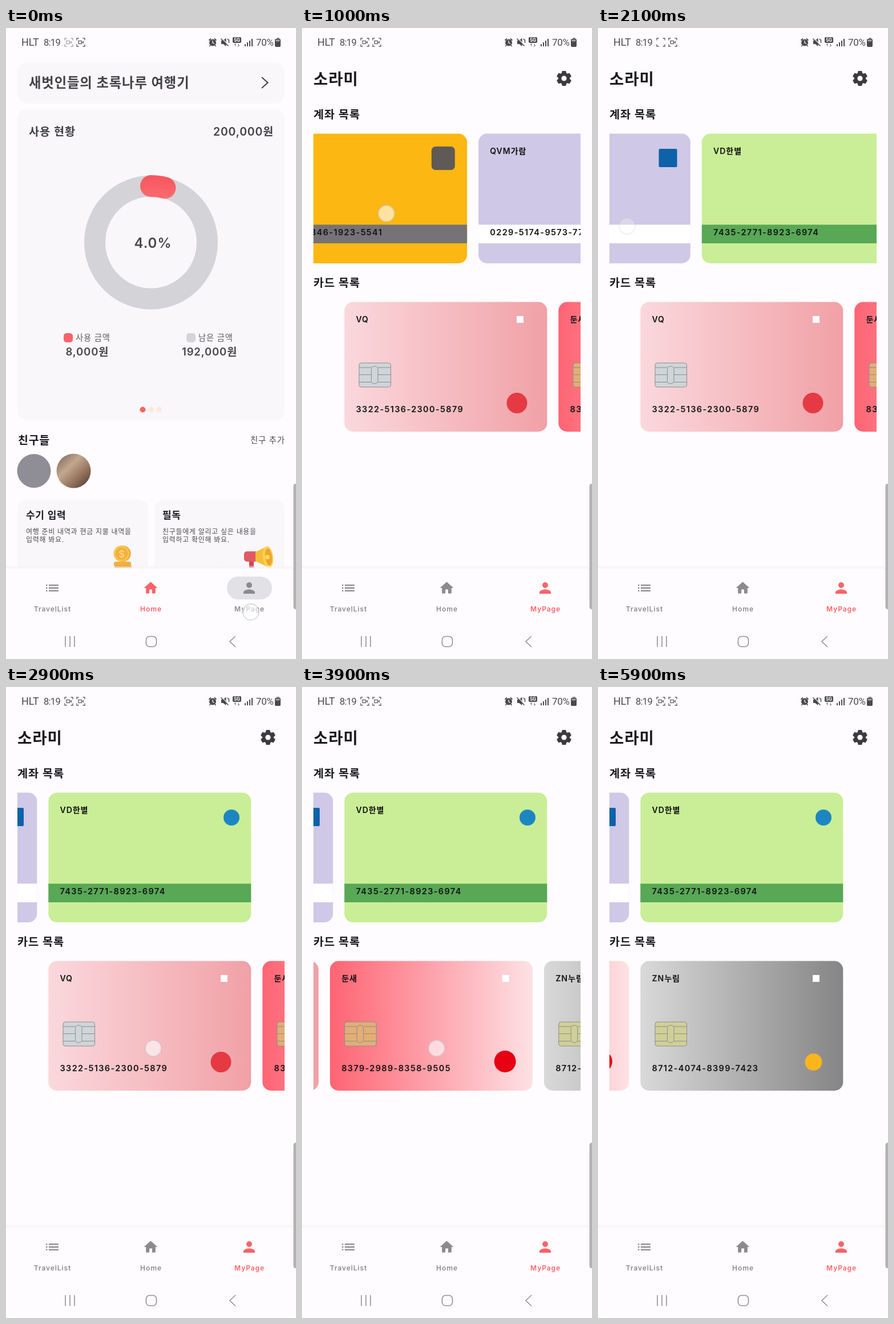
Write an HTML page with a canvas that moves like this. It is 508x1102 px and loops after 6 s.

```html
<!DOCTYPE html>
<html lang="ko">
<head>
<meta charset="utf-8">
<title>My page</title>
<style>
html, body { margin: 0; width: 100%; height: 100%; overflow: hidden; background: #fefcff; }
canvas { display: block; width: 100vw; height: 100vh; }
</style>
</head>
<body>
<canvas id="stage"></canvas>
<script>
const W = 508, H = 1102, LOOP = 6000, STEP = 100;
const PITCH = 375;
const FONT = 'Inter, "Noto Sans CJK KR", "Noto Sans CJK", sans-serif';
const BG = '#fefcff', PANEL = '#f9f7fa', RED = '#fb6268', INK = '#1c1b1f', GREY = '#8d8a8e';

const canvas = document.getElementById('stage');
const ctx = canvas.getContext('2d');
const dpr = window.devicePixelRatio || 1;
canvas.width = W * dpr;
canvas.height = H * dpr;

const clamp = v => Math.max(0, Math.min(1, v));
const smooth = v => { v = clamp(v); return v * v * (3 - 2 * v); };

function box(x, y, w, h, r, fill) {
  ctx.beginPath();
  ctx.roundRect(x, y, w, h, r);
  ctx.fillStyle = fill;
  ctx.fill();
}

function disc(x, y, r, fill) {
  ctx.beginPath();
  ctx.arc(x, y, r, 0, 7);
  ctx.fillStyle = fill;
  ctx.fill();
}

function line(points, color, width) {
  ctx.beginPath();
  points.forEach(([x, y]) => ctx.lineTo(x, y));
  ctx.strokeStyle = color;
  ctx.lineWidth = width;
  ctx.stroke();
}

function poly(points, fill) {
  ctx.beginPath();
  points.forEach(([x, y]) => ctx.lineTo(x, y));
  ctx.fillStyle = fill;
  ctx.fill();
}

function text(s, x, y, size, weight, color, gap = 0.7, align = 'left', font = FONT) {
  ctx.font = `${weight} ${size}px ${font}`;
  ctx.letterSpacing = gap + 'px';
  ctx.textAlign = align;
  ctx.fillStyle = color;
  ctx.fillText(s, x, y);
}

function sweep(x0, y0, x1, y1, ...colors) {
  const g = ctx.createLinearGradient(x0, y0, x1, y1);
  colors.forEach((c, i) => g.addColorStop(i / (colors.length - 1), c));
  return g;
}

function faded(alpha, draw) {
  if (alpha <= 0) return;
  ctx.save();
  ctx.globalAlpha *= alpha;
  draw();
  ctx.restore();
}

// ---------- status bar ----------
function recorder(x, color, on) {
  for (const sx of [-1, 1]) for (const sy of [-1, 1]) {
    line([[x + sx * 3.5, 25 + sy * 7], [x + sx * 7, 25 + sy * 7], [x + sx * 7, 25 + sy * 3.5]], color, 1.4);
  }
  if (!on) return;
  ctx.strokeStyle = color;
  ctx.lineWidth = 1.3;
  ctx.strokeRect(x - 4, 22.5, 5.5, 5);
  poly([[x + 2, 25], [x + 5, 22.5], [x + 5, 27.5]], color);
}

function statusBar(t) {
  const c = '#4a494c', f = 'Roboto, sans-serif';
  text('HLT', 27, 31, 18, 400, c, 0, 'left', f);
  text('8:19', 66, 31, 16.5, 400, c, -0.7, 'left', f);
  const blink = (t >= 1800 && t < 2200) || (t >= 4400 && t < 4900);
  recorder(110, t < 100 ? '#a5a4a7' : '#626164', !blink);
  recorder(131, '#626164', true);

  disc(362, 25.5, 6, c);
  line([[355.5, 21.5], [359, 18.5]], c, 1.8);
  line([[365, 18.5], [368.5, 21.5]], c, 1.8);
  line([[358, 30], [356.5, 32]], c, 1.6);
  line([[366, 30], [367.5, 32]], c, 1.6);
  line([[362, 22], [362, 26], [365, 27.5]], BG, 1.2);

  poly([[377, 22], [380.5, 22], [385.5, 17.5], [385.5, 32], [380.5, 28], [377, 28]], c);
  line([[377.5, 17.5], [390.5, 30.5]], BG, 1.2);
  line([[376.5, 18.5], [389.5, 31.5]], c, 1.5);
  line([[387.5, 19], [390.5, 21], [390.5, 26]], c, 1.5);

  box(397, 16, 15, 10, 2, c);
  text('5G', 404.5, 24, 8.5, 700, BG, 0, 'center', f);
  line([[402, 32], [402, 27.5], [400, 29.5]], '#8b8a8d', 1.2);
  line([[407, 27.5], [407, 32], [409, 30]], '#8b8a8d', 1.2);
  for (let i = 0; i < 4; i++) box(418 + i * 4, 28 - i * 3, 2, 4 + i * 3, 0, c);
  text('70%', 438, 31, 17, 400, c, -0.3, 'left', f);
  box(474, 17, 5, 3, 1, '#8b8a8d');
  box(471, 19, 10, 14, 2, c);
  box(472.5, 20.5, 7, 3, 0.5, '#a6a5a8');
}

// ---------- home ----------
function donut() {
  const y = 374.5, r = 98.5;
  ctx.lineWidth = 37;
  ctx.beginPath();
  ctx.arc(254, y, r, 0, 7);
  ctx.strokeStyle = '#d4d3d8';
  ctx.stroke();
  ctx.beginPath();
  ctx.arc(254, y, r, -Math.PI / 2, -Math.PI / 2 + Math.PI * 2 * 0.04);
  ctx.lineCap = 'round';
  ctx.strokeStyle = sweep(0, 257, 0, 298, '#f5565d', '#fc6b70');
  ctx.lineWidth = 38;
  ctx.stroke();
  ctx.lineCap = 'butt';
  text('4.0%', 257.5, 384, 24, 600, '#48474b', 1, 'center');
}

function coins() {
  for (let i = 0; i < 2; i++) box(189 + i, 932 + i * 6, 30, 8, 3, i ? '#e59a2c' : '#f2b13e');
  disc(204.5, 918, 14, '#e79d2d');
  disc(202.5, 918, 14, '#f9c34f');
  disc(202.5, 918, 10.5, '#f2b03d');
  text('$', 202.5, 924.5, 17, 600, '#fbd877', 0, 'center');
}

function megaphone() {
  box(426, 928, 8, 18, 2, '#cf4654');
  box(417, 914, 24, 18, 5, '#e05a66');
  poly([[437, 915], [458, 905], [462, 943], [437, 931]], '#f7bd38');
  ctx.beginPath();
  ctx.ellipse(459, 924, 9, 19, -0.12, 0, 7);
  ctx.fillStyle = '#fbd253';
  ctx.fill();
  ctx.beginPath();
  ctx.ellipse(460, 924, 6, 15, -0.12, 0, 7);
  ctx.fillStyle = '#eda62c';
  ctx.fill();
  disc(458, 924, 4, '#f9d565');
}

function legend(x, color, label, value, labelX, valueX) {
  box(x, 533, 16, 16, 5, color);
  text(label, labelX, 546, 14.3, 400, '#5c5b5f', 0.8);
  text(value, valueX, 572, 18.6, 600, '#48474b', 0.8);
}

function home() {
  box(20, 60, 468, 72, 17, PANEL);
  text('새벗인들의 초록나루 여행기', 40, 104, 23.3, 600, '#434246', 0.9);
  line([[448, 86], [458.5, 95.5], [448, 105]], '#434246', 2);

  box(20, 142, 468, 543, 17, PANEL);
  text('사용 현황', 40, 188, 19.7, 600, '#434246', 0.9);
  text('200,000원', 363, 188, 19.5, 600, '#434246', 0.8);
  donut();
  legend(101, RED, '사용 금액', '8,000원', 122, 104.5);
  legend(316, '#d4d3d8', '남은 금액', '192,000원', 337, 308);
  [RED, '#fde9e1', '#fde9e1'].forEach((c, i) => disc(239.5 + i * 14.5, 666.5, 5, c));

  text('친구들', 21, 727, 19.5, 600, INK);
  text('친구 추가', 428, 725, 14.3, 400, '#4d4c50', 0.8);
  disc(49, 773.5, 29.5, '#8f8d95');
  disc(118.5, 773.5, 30, sweep(95, 750, 142, 800, '#8b7566', '#c4a78f', '#96765f', '#5b4438'));

  box(20, 824, 229, 140, 17, PANEL);
  box(260, 824, 228, 140, 17, PANEL);
  const memo = (x, title, a, b) => {
    text(title, x, 857, 17, 600, INK, 0.7);
    text(a, x, 884, 12, 400, '#4d4c50', 0.7);
    text(b, x, 898, 12, 400, '#4d4c50', 0.7);
  };
  memo(35, '수기 입력', '여행 준비 내역과 현금 지물 내역을', '입력해 봐요.');
  memo(274, '필독', '친구들에게 알리고 싶은 내용을', '입력하고 확인해 봐요.');
  coins();
  megaphone();
}

// ---------- my page ----------
const LEFT = 74.3, WIDE = 355;
const accounts = [
  { name: 'ZN누림', no: '6203-5346-1923-5541', fill: '#fcb713', band: '#757377', mark: () => box(367, 207, 41, 41, 7, '#605a57') },
  { name: 'QVM가람', no: '0229-5174-9573-7795', fill: '#cfc8e6', band: '#ffffff', mark: () => box(374, 211, 32, 32, 2, '#0d62a8') },
  { name: 'VD한별', no: '7435-2771-8923-6974', fill: '#c9ee97', band: '#58a856', mark: () => disc(395, 228, 14, '#1d86c0') }
];
const cards = [
  { name: 'VQ', no: '3322-5136-2300-5879', from: '#fad8dc', to: '#f0a1a7', chip: '#cfd5d8', mark: () => disc(376.5, 655, 18, '#e53a44') },
  { name: '둔새', no: '8379-2989-8358-9505', from: '#fe6473', to: '#fde1e4', chip: '#e3ae76', mark: () => disc(381, 654, 19, '#e60113') },
  { name: 'ZN누림', no: '8712-4074-8399-7423', from: '#dad9da', to: '#868586', chip: '#d0cf97', mark: () => disc(377.5, 655, 15, '#fbb41c') }
];

function labels(item, nameY, noY) {
  text(item.name, 94.5, nameY, 14.1, 600, '#111', 0.9);
  text(item.no, 94.5, noY, 14.5, 600, '#111', 1.35);
}

function account(a) {
  box(LEFT, 184.5, WIDE, 226.5, 15, a.fill);
  box(LEFT, 343.5, WIDE, 32.5, 0, a.band);
  labels(a, 220, 361.5);
  a.mark();
}

function chip(fill) {
  const c = '#8a8d90';
  box(100, 585, 55.5, 42, 4, fill);
  ctx.strokeStyle = c;
  ctx.lineWidth = 1;
  ctx.stroke();
  for (const y of [593, 605.5, 618.5]) {
    line([[100, y], [121.5, y]], c, 1);
    line([[133, y], [155.5, y]], c, 1);
  }
  ctx.beginPath();
  ctx.roundRect(121.5, 591, 11.5, 30, 4.5);
  ctx.stroke();
}

function card(c) {
  box(LEFT, 478.5, WIDE, 226.5, 15, sweep(LEFT, 0, LEFT + WIDE, 0, c.from, c.to));
  labels(c, 514, 670.5);
  box(376, 503, 12, 12, 0, '#fff');
  chip(c.chip);
  c.mark();
}

function strip(items, draw, top, offset) {
  ctx.save();
  ctx.beginPath();
  ctx.rect(20, top, 468, 232);
  ctx.clip();
  items.forEach((item, i) => {
    ctx.save();
    ctx.translate(i * PITCH - offset, 0);
    draw(item);
    ctx.restore();
  });
  ctx.restore();
}

function gear(x, y) {
  const c = '#3c3b3f';
  for (let i = 0; i < 6; i++) {
    ctx.save();
    ctx.translate(x, y);
    ctx.rotate(i * Math.PI / 3);
    poly([[-4.6, -8], [-3.2, -13], [3.2, -13], [4.6, -8]], c);
    ctx.restore();
  }
  disc(x, y, 10, c);
  disc(x, y, 4.6, BG);
}

// Each swipe: list, touch time, drag start, drag length, touch point
const swipes = [
  { list: 0, down: 800, go: 834, dur: 400, x: 288, y: 324 },
  { list: 0, down: 1800, go: 1835, dur: 410, x: 261, y: 346 },
  { list: 1, down: 2900, go: 2930, dur: 360, x: 258, y: 631 },
  { list: 1, down: 3800, go: 3835, dur: 410, x: 261, y: 631 }
];
const travel = (s, t) => PITCH * smooth((t - s.go) / s.dur);
const scroll = (list, t) => swipes.reduce((sum, s) => sum + (s.list === list ? travel(s, t) : 0), 0);

function myPage(t) {
  text('소라미', 20, 99, 27.6, 600, INK, 0.9);
  gear(459, 88);
  text('계좌 목록', 20, 158, 19.7, 600, INK, 0.9);
  strip(accounts, account, 182, scroll(0, t));
  text('카드 목록', 20, 452, 19.7, 600, INK, 0.9);
  strip(cards, card, 476, scroll(1, t));
}

// ---------- bottom bars ----------
const icons = {
  list: new Path2D('M3 7h2v2H3zM3 11h2v2H3zM3 15h2v2H3zM7 7h14v2H7zM7 11h14v2H7zM7 15h14v2H7z'),
  home: new Path2D('M10 20v-6h4v6h5v-8h3L12 3 2 12h3v8z'),
  person: new Path2D('M12 12a4 4 0 1 0 0-8 4 4 0 0 0 0 8zM12 14c-2.67 0-8 1.34-8 4v2h16v-2c0-2.66-5.33-4-8-4z')
};

function tab(icon, label, x, scale, color) {
  ctx.save();
  ctx.translate(x - 12 * scale, 978 - 12 * scale);
  ctx.scale(scale, scale);
  ctx.fillStyle = color;
  ctx.fill(icons[icon]);
  ctx.restore();
  text(label, x + 0.5, 1019, 12, 600, color, 0.9, 'center');
}

function bottomBars(t) {
  box(0, 943, W, H - 943, 0, BG);
  box(0, 938, W, 6, 0, sweep(0, 938, 0, 944, 'rgba(245,243,247,0)', '#f5f3f7'));
  faded(1 - t / 400, () => box(387, 958, 79, 40, 20, '#e2e1e5'));
  const mine = t >= 100;
  tab('list', 'TravelList', 81, 1.22, GREY);
  tab('home', 'Home', 253.5, 1.19, mine ? GREY : RED);
  tab('person', 'MyPage', 426, 1.25, mine ? RED : GREY);

  const c = '#929194';
  for (const x of [104, 112, 120]) line([[x, 1062], [x, 1081]], c, 1.6);
  ctx.beginPath();
  ctx.roundRect(245.5, 1062.5, 18, 18, 6);
  ctx.stroke();
  line([[402, 1062], [392, 1071.5], [402, 1081]], c, 1.6);
  box(503.5, 796, 10, 219, 4, '#b2b1b4');
}

function touch(x, y, alpha) {
  faded(alpha, () => {
    disc(x, y, 14, 'rgba(255,255,255,0.6)');
    ctx.strokeStyle = 'rgba(200,198,204,0.65)';
    ctx.lineWidth = 1.8;
    ctx.stroke();
  });
}

function touches(t) {
  touch(429, 1020, 1 - t / 300);
  for (const s of swipes) {
    const age = t - s.down;
    if (age >= 0) touch(s.x - Math.min(travel(s, t), 210), s.y, age <= 200 ? 1 : 1 - (age - 200) / 180);
  }
}

function draw(t) {
  ctx.setTransform(canvas.width / W, 0, 0, canvas.height / H, 0, 0);
  box(0, 0, W, H, 0, BG);
  const mix = t >= 600 ? 1 : smooth(Math.pow(t / 650, 0.75));
  faded(1 - mix, home);
  faded(mix, () => myPage(t));
  statusBar(t);
  bottomBars(t);
  touches(t);
}

const start = performance.now();
function tick() {
  const t = (performance.now() - start) % LOOP;
  draw(Math.floor(t / STEP) * STEP);
  requestAnimationFrame(tick);
}
tick();
</script>
</body>
</html>
```
